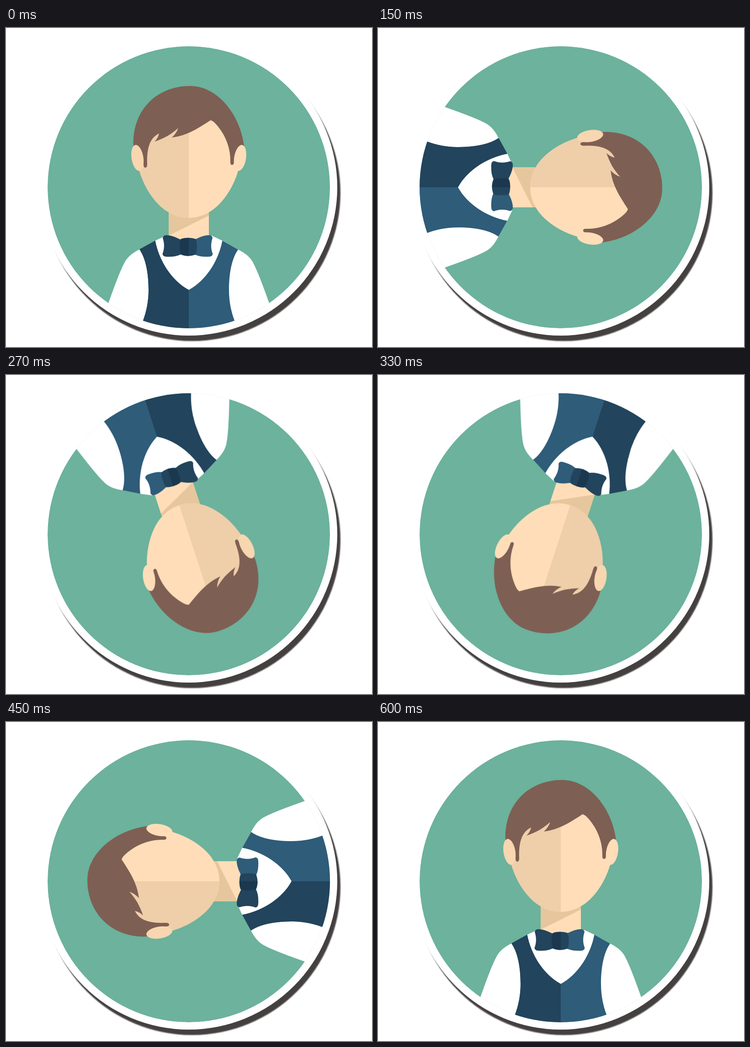
Recreate the animation shown at these times as an HTML page. Size 801 by 699 pixels, loop 670 ms.

```html
<!DOCTYPE html>
<html lang="en">
<head>
<meta charset="utf-8">
<title>Spinning avatar</title>
<style>
  html, body { margin: 0; width: 100%; height: 100%; overflow: hidden; background: #fff; }
  svg { display: block; width: 100%; height: 100%; }
  .person { transform-origin: 400px 349px; animation: spin 670ms infinite; }
  /* twenty hard 18 degree steps of 30 ms, then a short rest */
  @keyframes spin {
    0% { transform: rotate(0deg); animation-timing-function: steps(20, end); }
    89.552% { transform: rotate(360deg); }
    100% { transform: rotate(360deg); }
  }
  .white { fill: #fff; }
  .green { fill: #6cb29c; }
  .hair { fill: #7e5f53; }
  .skin { fill: #ffddb8; }
  .skin-dim { fill: #efceaa; }
  .ear-dim { fill: #f7d6b0; }
  .neck-dim { fill: #e6c79d; }
  .blue { fill: #2e5c79; }
  .navy { fill: #22445c; }
  .ink { fill: #1b384f; }
</style>
</head>
<body>
<svg viewBox="0 0 801 699">
  <defs>
    <clipPath id="disc"><circle cx="400" cy="349" r="309"/></clipPath>
    <clipPath id="left"><rect x="80" y="30" width="320" height="640"/></clipPath>
    <filter id="soft" x="-5%" y="-5%" width="110%" height="110%"><feGaussianBlur stdDeviation="1.3"/></filter>
    <path id="face" d="M292 313 C288 290 290 230 320 205 C360 180 440 180 480 205 C510 230 512 290 508 313
      C496 355 460 416 400 416 C340 416 304 355 292 313 Z"/>
    <path id="vest" d="M292 485 C308 508 312 545 312 574 C312 600 307 622 300 641 L292 665 H508 L500 641
      C493 622 488 600 488 574 C488 545 492 508 508 485.500 L473.500 466 C465 510 438 553 400 574 C362 553 335 510 326.500 466 Z"/>
    <path id="wing" d="M343 460 Q344 454.500 350 454 C362 453.500 372 459 383 464 V496 C372 501 360 502 350 501
      Q343 500.500 342.500 495 C347 484 347 472 343 460 Z"/>
    <path id="knot" d="M382 463 C391 458.700 407 458.700 416 463 C418 474 418 486 415.500 496
      C407 500.500 391 500.500 382.500 496 C379.500 486 379.500 474 382 463 Z"/>
    <ellipse id="ear" cx="287.700" cy="284.700" rx="13" ry="28.700" transform="rotate(-9 287.700 284.700)"/>
  </defs>

  <circle cx="407" cy="361" r="325" fill="#454141" filter="url(#soft)"/>
  <circle class="white" cx="400" cy="349" r="325"/>

  <g clip-path="url(#disc)">
    <circle class="green" cx="400" cy="349" r="309"/>
    <g class="person">
      <path class="white" d="M200 670 L224 603 C236 570 248 535 260 513 C267 500 279 492 292 485 L326.500 466 L350 455 L356 464
        H444 L450 455 L473.500 466 L508 485.500 C521 492 533 500 540 513 C552 535 564 570 576 603 L600 670 Z"/>
      <use href="#vest" class="blue"/>
      <use href="#vest" class="navy" clip-path="url(#left)"/>

      <rect class="skin" x="356" y="390" width="88" height="77"/>
      <path class="neck-dim" d="M356 390 H444 V411 L356 455 Z"/>

      <use href="#wing" class="navy"/>
      <use href="#wing" class="blue" transform="translate(795) scale(-1 1)"/>
      <use href="#knot" class="navy"/>
      <use href="#knot" class="ink" clip-path="url(#left)"/>

      <use href="#face" class="skin"/>
      <use href="#face" class="skin-dim" clip-path="url(#left)"/>
      <path class="hair" d="M279 258 C276 180 330 127 403 127 C462 127 512 188 521 258 L503 275 C499 283 500 290 499 294
        Q498.500 300 494.500 300 Q491 300 491 294 C492 263 480 232 457 208 Q453 204 448 202
        C420 220 396 236 363 240 Q373 231 377 219 C362 233 346 242 325 249 Q333 241 335 231
        C313 242 308 266 309 298 Q309 306 305 306 Q301.500 306 301 300 C301 286 298 276 292 265 Z"/>
      <use href="#ear" class="ear-dim"/>
      <use href="#ear" class="skin" transform="translate(800) scale(-1 1)"/>
    </g>
  </g>
</svg>
</body>
</html>
```
